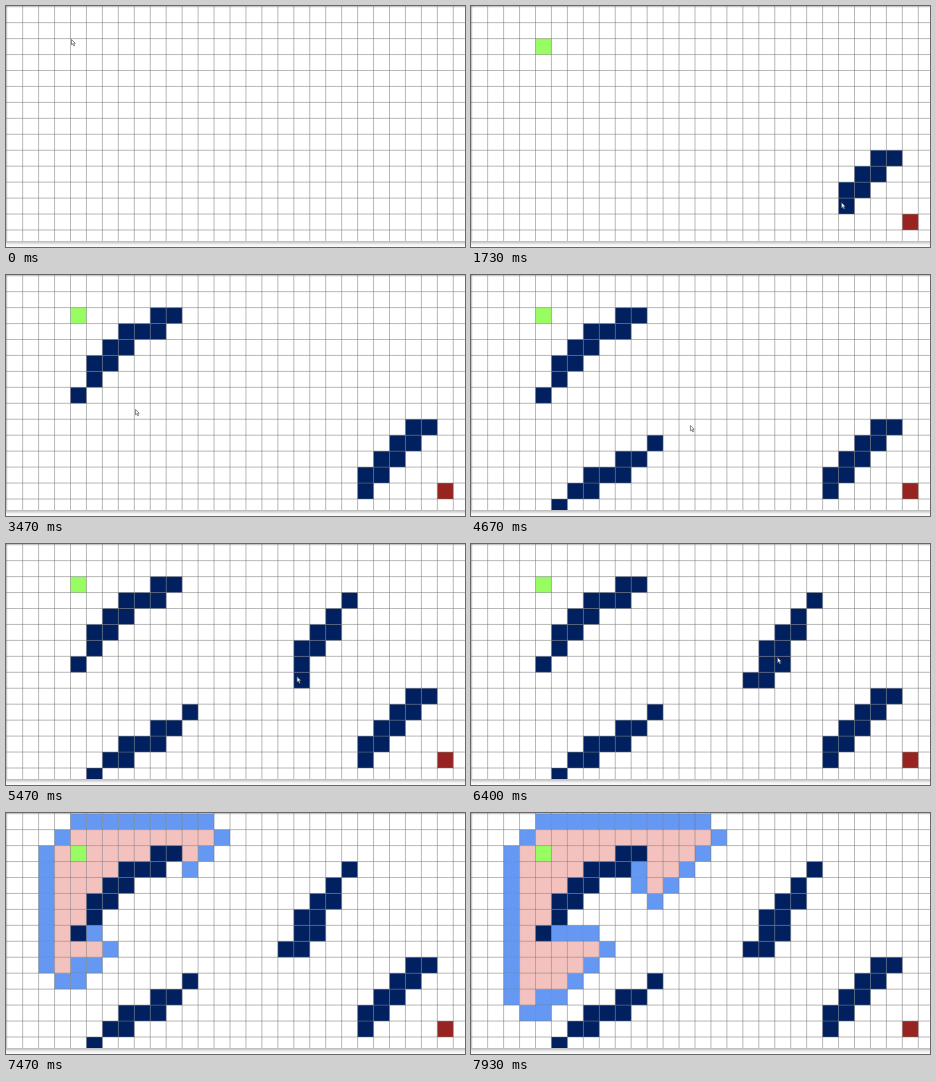
An HTML page with a canvas that plays this animation: 459x241 px, repeating every 8000 ms.

```html
<!DOCTYPE html>
<html lang="en">
<head>
<meta charset="utf-8">
<title>Grid path search</title>
<style>
html, body { margin: 0; width: 100%; height: 100%; overflow: hidden; background: #fff; }
canvas { display: block; }
</style>
</head>
<body>
<canvas width="459" height="241"></canvas>
<script>
const ctx = document.querySelector('canvas').getContext('2d');
const LOOP = 8000, TICK = 1000 / 15;
const CELL = 15.95, EDGE = 0.7, COLS = 29, ROWS = 15, FLOOR = 235;
const COLORS = { start: '#97fd62', goal: '#982421', wall: '#002060', open: '#6498f2', closed: '#f4c2be' };
const START = [4, 2], GOAL = [27, 13];
const START_AT = 130, GOAL_AT = 930, SEARCH_AT = 6500, POP_MS = 29.1;
const STEPS = { L: [-1, 0], D: [0, 1], Z: [-1, 1] };

const pos = n => EDGE + n * CELL;
const key = (c, r) => r * COLS + c;
const walls = [];
const path = [];
const rest = (t, x, y) => path.push([t, x, y]);

// A dragged stroke paints cells at an even pace, with the pointer on the newest one.
function stroke(from, to, c, r, moves) {
  const place = i => {
    const t = from + (to - from) * i / moves.length;
    walls.push({ t, c, r });
    rest(t, pos(c + 0.45), pos(r + 0.25));
  };
  place(0);
  [...moves].forEach((m, i) => {
    c += STEPS[m][0];
    r += STEPS[m][1];
    place(i + 1);
  });
}

rest(0, 65, 33);
rest(270, 65, 33);
rest(730, 432, 208);
rest(860, 432, 208);
rest(1000, 438, 215);
rest(1200, 436, 212);
stroke(1450, 1810, 26, 9, 'LDLDLDLD');
rest(2000, 350, 203);
stroke(2550, 3100, 10, 2, 'LDLLDLDLDZ');
rest(3200, 72, 124);
rest(3467, 129, 134);
stroke(3620, 3980, 11, 10, 'ZLDLLDLZ');
rest(4130, 92, 226);
rest(4667, 219, 150);
stroke(4930, 5520, 21, 3, 'ZDLDLDDL');
rest(5650, 279, 132);
rest(5800, 308, 118);
rest(6130, 306, 113);
walls.push({ t: 5800, c: 19, r: 7 });

function pointerAt(t) {
  const i = path.findIndex(p => p[0] > t);
  if (i < 0) return path[path.length - 1].slice(1);
  const [t0, x0, y0] = path[i - 1], [t1, x1, y1] = path[i];
  const k = (t - t0) / (t1 - t0);
  return [x0 + (x1 - x0) * k, y0 + (y1 - y0) * k];
}

// A* with Manhattan distance; equal scores are taken in order of discovery.
function search(count) {
  const blocked = new Set(walls.map(w => key(w.c, w.r)));
  const node = (c, r, g) => ({ c, r, g, f: g + Math.abs(GOAL[0] - c) + Math.abs(GOAL[1] - r) });
  const open = [node(...START, 0)], closed = [];
  const seen = new Set([key(...START)]);
  let current;
  for (let i = 0; i < count && open.length; i++) {
    if (current) closed.push(current);
    const best = open.reduce((b, n, j) => n.f < open[b].f ? j : b, 0);
    current = open.splice(best, 1)[0];
    for (const [dc, dr] of [[1, 0], [0, 1], [-1, 0], [0, -1]]) {
      const c = current.c + dc, r = current.r + dr, id = key(c, r);
      if (c < 0 || r < 0 || c >= COLS || r >= ROWS || blocked.has(id) || seen.has(id)) continue;
      seen.add(id);
      open.push(node(c, r, current.g + 1));
    }
  }
  if (current) open.push(current);
  return { open, closed };
}

function fillCell(c, r, color) {
  const y = pos(r);
  ctx.fillStyle = color;
  ctx.fillRect(pos(c), y, CELL, Math.min(CELL, FLOOR - y));
}

function drawGrid() {
  ctx.strokeStyle = 'rgba(115,115,115,0.5)';
  ctx.lineWidth = 1;
  ctx.beginPath();
  for (let c = 0; c < COLS; c++) {
    ctx.moveTo(pos(c), 0);
    ctx.lineTo(pos(c), FLOOR);
  }
  for (let r = 0; r < ROWS; r++) {
    ctx.moveTo(0, pos(r));
    ctx.lineTo(459, pos(r));
  }
  ctx.stroke();
  const shade = ctx.createLinearGradient(0, FLOOR, 0, 241);
  shade.addColorStop(0, '#b8b8b8');
  shade.addColorStop(0.3, '#d4d4d4');
  shade.addColorStop(0.6, '#f2f2f2');
  shade.addColorStop(1, '#fcfcfc');
  ctx.fillStyle = shade;
  ctx.fillRect(0, FLOOR, 459, 6);
}

function drawPointer(x, y) {
  ctx.save();
  ctx.translate(x, y);
  ctx.beginPath();
  [[0.5, 0.5], [0.5, 5.8], [1.7, 4.8], [2.7, 6.9], [3.6, 6.5], [2.7, 4.4], [4.3, 4.3]]
    .forEach(p => ctx.lineTo(...p));
  ctx.closePath();
  ctx.fillStyle = '#fff';
  ctx.strokeStyle = '#555';
  ctx.lineWidth = 0.7;
  ctx.fill();
  ctx.stroke();
  ctx.restore();
}

function draw(t) {
  ctx.fillStyle = '#fff';
  ctx.fillRect(0, 0, 459, 241);
  if (t >= SEARCH_AT) {
    const { open, closed } = search(Math.floor((t - SEARCH_AT) / POP_MS));
    open.forEach(n => fillCell(n.c, n.r, COLORS.open));
    closed.forEach(n => fillCell(n.c, n.r, COLORS.closed));
  }
  walls.filter(w => w.t <= t).forEach(w => fillCell(w.c, w.r, COLORS.wall));
  if (t >= START_AT) fillCell(...START, COLORS.start);
  if (t >= GOAL_AT) fillCell(...GOAL, COLORS.goal);
  drawGrid();
  if (t < SEARCH_AT) drawPointer(...pointerAt(t));
}

const begin = performance.now();
function frame() {
  const t = (performance.now() - begin) % LOOP;
  draw(Math.floor((t + 5) / TICK) % 120 * TICK);
  requestAnimationFrame(frame);
}
frame();
</script>
</body>
</html>
```
